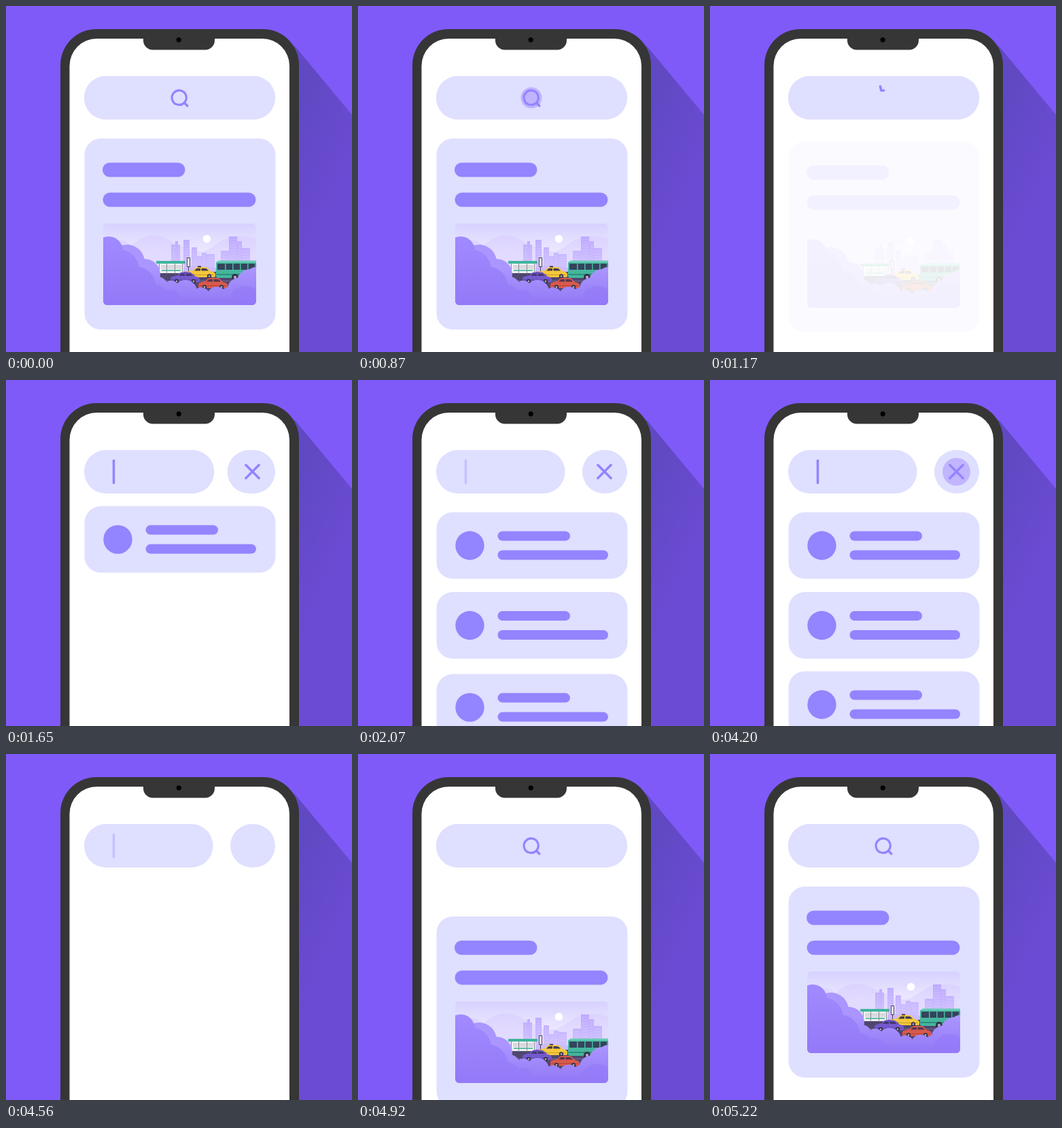
Animation of 509 by 509 pixels, one loop 6030 ms. Source, as an HTML page:

```html
<!DOCTYPE html>
<html lang="en">
<head>
<meta charset="utf-8">
<title>Search flow</title>
<style>
  html, body { margin: 0; width: 100%; height: 100%; overflow: hidden; background: #7f5af9; }
  svg { display: block; width: 100vw; height: 100vh; }
</style>
</head>
<body>
<svg viewBox="0 0 509 509">
  <defs>
    <linearGradient id="shade" gradientUnits="userSpaceOnUse" x1="425" y1="150" x2="530" y2="200">
      <stop offset="0" stop-color="#6049c3"/><stop offset="1" stop-color="#6c4bd4"/>
    </linearGradient>
    <linearGradient id="sky" x2="0" y2="1">
      <stop offset="0" stop-color="#d6d2ff"/><stop offset=".45" stop-color="#f3efff"/><stop offset="1" stop-color="#e4dcff"/>
    </linearGradient>
    <linearGradient id="hill" x2="0" y2="1">
      <stop offset="0" stop-color="#dbd3ff"/><stop offset="1" stop-color="#efeaff"/>
    </linearGradient>
    <linearGradient id="tower" gradientUnits="userSpaceOnUse" x1="0" y1="338" x2="0" y2="395">
      <stop offset="0" stop-color="#bda9ff"/><stop offset="1" stop-color="#d6c9ff"/>
    </linearGradient>
    <linearGradient id="bush" gradientUnits="userSpaceOnUse" x1="0" y1="340" x2="0" y2="440">
      <stop offset="0" stop-color="#a18aff"/><stop offset="1" stop-color="#9479f7"/>
    </linearGradient>
    <linearGradient id="bushLight" gradientUnits="userSpaceOnUse" x1="0" y1="385" x2="0" y2="440">
      <stop offset="0" stop-color="#ab96ff"/><stop offset="1" stop-color="#9278f5"/>
    </linearGradient>
    <clipPath id="photo"><rect x="143" y="320" width="225" height="120" rx="6"/></clipPath>
  </defs>

  <rect width="509" height="509" fill="#7f5af9"/>
  <path d="M424 58 509 160V509H425Z" fill="url(#shade)"/>
  <path d="M80 520V87a53 53 0 0 1 53-53H378a53 53 0 0 1 53 53V520Z" fill="#363636"/>
  <path d="M93.500 520V88a40 40 0 0 1 40-40H377a40 40 0 0 1 40 40V520Z" fill="#fff"/>
  <path d="M202 47H307V50a14 14 0 0 1-14 14.500H216a14 14 0 0 1-14-14.500Z" fill="#363636"/>
  <circle cx="254.200" cy="49.800" r="3.600"/>

  <g id="article">
    <rect x="115.500" y="195" width="281" height="281" rx="24" fill="#dfdfff"/>
    <g fill="#9384ff">
      <rect x="142" y="230.500" width="121.500" height="21" rx="10.500"/>
      <rect x="142.500" y="274.500" width="225" height="21" rx="10.500"/>
    </g>
    <g id="scene" clip-path="url(#photo)"></g>
  </g>
  <g id="results"></g>

  <g fill="#dfdfff">
    <rect id="closePill" y="103" height="64" rx="32"/>
    <rect id="searchPill" x="115" y="103" height="64" rx="32"/>
  </g>
  <circle id="ripple" cy="135" fill="#9f86ff"/>
  <g fill="none" stroke="#9384ff" stroke-width="3.200" stroke-linecap="round">
    <path id="lens"/>
    <path id="handle" d="M11 0H17" stroke-width="3.600"/>
    <path id="cursor" d="M158.500 118.500V151.500" stroke-width="3.500"/>
    <path id="cross" d="M-9.700-9.700 9.700 9.700M9.700-9.700-9.700 9.700" stroke-width="3.500"/>
  </g>
</svg>
<script>
const $ = id => document.getElementById(id);
const LOOP = 6030, STEP = 30;
const OPEN_TAP = 780, OPEN = 1410, CLOSE_TAP = 3990, CLOSE = 4620;
const CARD_TOPS = [194.5, 312, 428.5];

const rect = (x, y, w, h, fill, rx = 0) =>
  `<rect x="${x}" y="${y}" width="${w}" height="${h}" rx="${rx}" fill="${fill}"/>`;
const circle = (x, y, r, fill) => `<circle cx="${x}" cy="${y}" r="${r}" fill="${fill}"/>`;
const path = (d, fill) => `<path d="${d}" fill="${fill}"/>`;
const wheel = (x, y, r) => circle(x, y, r, '#332f45') + circle(x, y, r * .45, '#a9a4bb');

function car(x, y, color, glass) {
  return `<g transform="translate(${x} ${y})">` +
    path('M0 13V9q1-3 10-4l4-4q1-1 4-1h9q3 0 5 2l4 4q6 1 7 4v3q0 2-3 2H3q-3 0-3-2Z', color) +
    path('M12 5.500 15.500 2H21V5.500ZM22.500 2H28q2 0 3 1.500L33 5.500H22.500Z', glass) +
    rect(1, 11, 40, 1, '#00000033') + wheel(9, 13.5, 3.2) + wheel(34, 13.5, 3.2) + '</g>';
}

function bus() {
  let s = rect(309, 376, 66, 24, '#45b69d', 3) + rect(312, 374.5, 60, 3, '#67cdb6', 1) +
    rect(311, 379, 64, 9, '#34445c', 1) + rect(310, 394, 62, 2, '#2d8f7c');
  for (let x = 322; x < 370; x += 11) s += rect(x, 378, 1.6, 11, '#45b69d');
  return s + wheel(337, 399, 5);
}

function busStop() {
  let s = rect(221, 375, 43, 4, '#3fb59b', 1) + rect(225, 379, 36, 14, '#f3f1f5') +
    rect(228, 381, 30, 6, '#d9dadd') + rect(229, 388, 28, 2, '#58c2a9');
  for (const x of [225, 236, 248, 259]) s += rect(x, 379, 1, 15, '#8a8798');
  return s + rect(266, 370, 5, 14, '#464052', .8) + rect(267, 371, 3, 12, '#fff') + rect(268, 384, 1, 8, '#464052');
}

function buildScene() {
  const towers = [[243, 351, 13], [249, 346, 4], [261, 344, 9], [273, 355, 8], [281, 368, 8],
    [288, 363, 7], [295, 365, 12], [316, 360, 12], [328, 339, 12], [340, 346, 7], [346, 356, 13]];
  let s = rect(143, 320, 225, 120, 'url(#sky)');
  s += path('M143 357Q165 335 185 352Q205 332 231 340Q248 348 268 358T310 350T368 342V410H143Z', 'url(#hill)');
  s += path('M185 375Q215 345 240 364Q275 373 295 361Q325 348 368 370V410H185Z', '#e3dbff');
  s += circle(295.5, 342.5, 5.8, '#fff');
  for (const [x, y, w] of towers) {
    s += rect(x, y, w, 56, 'url(#tower)');
    for (let wy = y + 4; wy < 380; wy += 4) s += rect(x + 2, wy, w - 4, .7, '#ffffff40');
  }
  s += path('M205 391Q220 384 245 387Q280 379 310 385H368V400H205Z', '#cbbcff');
  s += rect(200, 391, 168, 40, '#50476f') + rect(220, 404, 148, .8, '#81789c');
  s += busStop();
  s += car(265, 384, '#f5c83c', '#423c50') + rect(282, 382.5, 5, 2, '#3c374b');
  s += bus();
  s += car(242, 391.5, '#7459cf', '#423873');
  s += car(283, 400, '#d9594c', '#55364f');
  const lobes = (list, fill) => list.map(([x, y, r]) => circle(x, y, r, fill)).join('');
  s += lobes([[360, 408, 21], [342, 416, 16], [368, 398, 14]], 'url(#bushLight)');
  s += lobes([[178, 377, 26], [204, 395, 23], [222, 415, 17]], 'url(#bushLight)');
  s += lobes([[151, 360, 21], [166, 388, 30], [190, 414, 31]], 'url(#bush)');
  s += lobes([[243, 416, 12], [264, 420, 17], [287, 427, 13], [310, 428, 15], [330, 429, 16]], 'url(#bushLight)');
  s += lobes([[152, 421, 27], [216, 433, 24], [242, 434, 16], [352, 436, 24]], 'url(#bush)');
  return s + path('M143 400Q190 404 228 430H368V440H143Z', 'url(#bush)');
}

const resultCard = () => '<g>' + rect(115.5, 0, 281, 98, '#dfdfff', 24) + circle(164.5, 49, 21.2, '#9384ff') +
  rect(205.5, 28, 106.5, 14, '#9384ff', 7) + rect(205.5, 56, 162.5, 14, '#9384ff', 7) + '</g>';

$('scene').innerHTML = buildScene();
$('results').innerHTML = CARD_TOPS.map(resultCard).join('');
const cards = [...$('results').children];

const clamp = v => Math.min(1, Math.max(0, v));
const progress = (t, start, length) => clamp((t - start) / length);
const mix = (a, b, p) => a + (b - a) * p;
const outCubic = p => 1 - (1 - p) ** 3;
const inOut = p => p * p * (3 - 2 * p);
const outBack = (p, s = .93) => 1 + (s + 1) * (p - 1) ** 3 + s * (p - 1) ** 2;
const set = (el, attrs) => { for (const k in attrs) el.setAttribute(k, attrs[k]); };

// Fade with a slight drop that follows a tap.
function leave(t, tap) {
  const p = progress(t, tap + 210, 270);
  return { opacity: (1 - p) ** 2, drop: 6 * p };
}

function drawMagnifier(t) {
  const gone = t < 3000 ? inOut(progress(t, OPEN_TAP + 150, 270)) : 1 - outCubic(progress(t, CLOSE + 20, 260));
  const from = mix(45, 263, gone), to = mix(404.9, 272, gone);
  const at = deg => {
    const a = deg * Math.PI / 180;
    return `${254.7 + 10.6 * Math.cos(a)} ${134.8 + 10.6 * Math.sin(a)}`;
  };
  const opacity = gone < 1 ? 1 : 0;
  set($('lens'), { d: `M${at(from)}A10.6 10.6 0 ${to - from > 180 ? 1 : 0} 1 ${at(to)}`, opacity });
  set($('handle'), { transform: `translate(254.7 134.8) rotate(${from})`, opacity });
}

function drawRipple(t) {
  const closing = t > 3000, dt = t - (closing ? CLOSE_TAP : OPEN_TAP);
  set($('ripple'), {
    cx: closing ? 362.5 : 255,
    r: 20.5 * outCubic(progress(dt, 0, 240)),
    opacity: dt < 0 ? 0 : .48 * (1 - progress(dt, 210, 150))
  });
}

function drawArticle(t) {
  const out = leave(t, OPEN_TAP);
  const back = t >= CLOSE;
  const y = back ? 352 * (1 - progress(t, CLOSE, 600)) ** 3 : out.drop;
  set($('article'), { transform: `translate(0 ${y})`, opacity: back ? 1 : out.opacity });
}

function drawResults(t) {
  const out = leave(t, CLOSE_TAP);
  cards.forEach((card, i) => {
    const y = CARD_TOPS[i] + 320 * (1 - outBack(progress(t, OPEN + 234 * i, 390))) + out.drop;
    set(card, { transform: `translate(0 ${y})`, opacity: t < OPEN ? 0 : out.opacity });
  });
}

function drawSearch(t) {
  const split = outCubic(progress(t, OPEN, 330)) - outCubic(progress(t, CLOSE, 270));
  const left = mix(115, 330, split);
  set($('searchPill'), { width: mix(281, 189.5, split) });
  set($('closePill'), { x: left, width: 396 - left });

  const size = outCubic(progress(t, OPEN + 30, 200)) * (1 - inOut(progress(t, CLOSE_TAP + 240, 300)));
  set($('cross'), { transform: `translate(362.5 134.8) scale(${size})`, opacity: size > 0 ? 1 : 0 });

  const phase = (t - 1380 + 660 * 3) % 660;
  const blink = phase < 420 ? clamp((phase + 30) / 180) : 1 - progress(phase, 420, 180);
  set($('cursor'), { opacity: t >= 1380 && t < CLOSE ? blink : 0 });
}

function render(t) {
  drawArticle(t);
  drawResults(t);
  drawSearch(t);
  drawRipple(t);
  drawMagnifier(t);
}

const start = performance.now();
function tick() {
  const t = (performance.now() - start) % LOOP;
  render(Math.floor(t / STEP) * STEP);
  requestAnimationFrame(tick);
}
tick();
</script>
</body>
</html>
```
